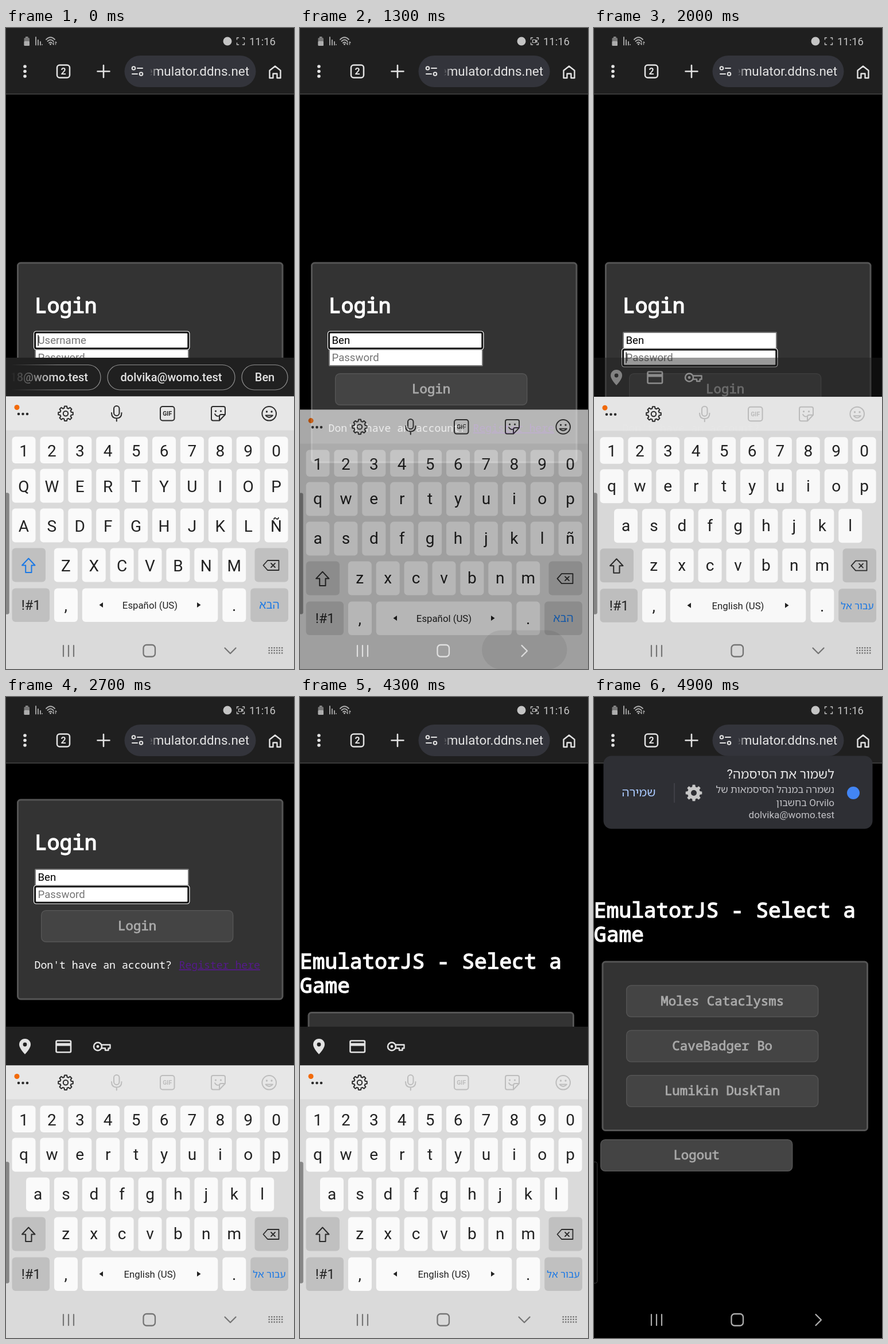
Animation, 502 px wide and 1116 px high, one loop 5000 ms. Source, as an HTML page:

```html
<!DOCTYPE html>
<html lang="en">
<head>
<meta charset="utf-8">
<title>Mobile login</title>
<style>
html, body { margin: 0; width: 100%; height: 100%; overflow: hidden; background: #000; }
svg { display: block; width: 100vw; height: 100vh; font-family: Roboto, 'Noto Sans Hebrew', 'Liberation Sans', sans-serif; }
text { white-space: pre; }
.mono { font-family: 'Noto Sans Mono', monospace; fill: #fff; }
.title { font-size: 36.2px; stroke: #fff; stroke-width: 1.5; }
.body { font-size: 18.15px; }
.btn { font-size: 22.4px; fill: #a9a9a9; stroke: #a9a9a9; stroke-width: .9; }
.field { font-size: 18.6px; }
.chip { font-size: 20px; font-weight: 500; fill: #e3e3e3; }
.key { font-size: 28px; fill: #222; }
.mid { text-anchor: middle; }
.end { text-anchor: end; }
.rtl { direction: rtl; text-anchor: start; }
.line { fill: none; stroke-linecap: round; stroke-linejoin: round; }
</style>
</head>
<body>
<svg id="stage" viewBox="0 0 502 1116" preserveAspectRatio="none"></svg>
<script>
const LOOP = 5000, STEP = 100;
const NAME = 'Ben', MAIL = 'dolvika@womo.test';
const GAMES = ['Moles Cataclysms', 'CaveBadger Bo', 'Lumikin DuskTan'];

const rect = (x, y, w, h, r, fill, more = '') =>
  `<rect x="${x}" y="${y}" width="${w}" height="${h}" rx="${r}" fill="${fill}" ${more}/>`;
const text = (x, y, s, cls = '', more = '') => `<text x="${x}" y="${y}" class="${cls}" ${more}>${s}</text>`;
const line = (d, color, w = 2, more = '') => `<path class="line" d="${d}" stroke="${color}" stroke-width="${w}" ${more}/>`;
const dot = (x, y, r, fill, more = '') => `<circle cx="${x}" cy="${y}" r="${r}" fill="${fill}" ${more}/>`;
const group = (id, body, more = '') => `<g id="${id}" ${more}>${body}</g>`;
const clamp = v => Math.max(0, Math.min(1, v));

function gear(cx, cy, r, teeth) {
  const pts = [];
  for (let i = 0; i < teeth; i++)
    for (const [k, f] of [[-.34, .76], [-.2, 1], [.2, 1], [.34, .76]]) {
      const a = (i + k) / teeth * 2 * Math.PI - Math.PI / 2;
      pts.push((cx + Math.cos(a) * r * f).toFixed(1) + ' ' + (cy + Math.sin(a) * r * f).toFixed(1));
    }
  return 'M' + pts.join('L') + 'Z';
}

// Browser page
const panel = (x, y, w, h) => rect(x, y, w, h, 5, '#333', 'stroke="#555" stroke-width="3"');
const button = (x, y, label) =>
  rect(x + .7, y + .7, 334, 54.6, 8, '#444', 'stroke="#555" stroke-width="1.4"') +
  text(x + 167.7, y + 35, label, 'mono btn mid');
const box = y => rect(51, y, 267, 28, 1, '#fff', 'stroke="#767676" stroke-width="2"');
const ring = (id, y) => group(id,
  rect(48.7, y - 1.8, 271, 31.6, 4, 'none', 'stroke="#fff" stroke-width="1.6"') +
  rect(50.6, y, 267.2, 28, 2.5, '#fff', 'stroke="#101010" stroke-width="3"'));

const login = panel(20.5, 409, 461.5, 347) +
  text(50, 496, 'Login', 'mono title') +
  box(530) + box(560) + ring('ringUser', 530) + ring('ringPass', 560) +
  text(55.5, 550, '', 'field', 'id="user"') + text(55.5, 580, '', 'field', 'id="pass"') +
  rect(0, 0, 1.3, 19, 0, '#000', 'id="caret"') +
  button(61, 601, 'Login') +
  text(49.5, 703, "Don't have an account?", 'mono body') +
  text(301.5, 703, 'Register here', 'mono body', 'style="fill:#551a8b" text-decoration="underline"');

const heading = y => text(0, y, 'EmulatorJS - Select a', 'mono title') + text(0, y + 42, 'Game', 'mono title');
const loading = heading(473) + panel(15, 549.5, 461.5, 116) +
  text(44.5, 614, 'Loading games...', 'mono body', 'style="font-size:18px"') + button(11, 682, 'Logout');
const games = heading(384) + panel(15, 461, 461.5, 293.5) +
  GAMES.map((g, i) => button(56, 501.5 + i * 78.3, g)).join('') + button(11, 770, 'Logout');

// Status bar and address bar
const INK = '#e3e3e3', DIM = '#c4c4c4', FAINT = '#adadad';
const header = rect(0, 0, 502, 115, 0, '#1f1f1f') + rect(0, 114.3, 502, 1.4, 0, '#4a4a4a') +
  rect(34, 15, 4.5, 3, 0, '#888') + rect(31.5, 17, 9.5, 14, 1.5, '#777') + rect(31.5, 23, 9.5, 8, 1.5, FAINT) +
  line('M52 16V29.500M56 21V29.500M60 24V29.500', FAINT, 1.8) + dot(63, 29, .9, FAINT) +
  line('M70 20Q77.500 12.500 85 20M72.500 23Q77.500 18 82.500 23M75 26Q77.500 23.500 80 26', FAINT, 1.8) +
  dot(77.5, 28.3, 1.5, FAINT) + line('M83 24V29M81.500 27.500L83 29.200M86.500 29V24M86.500 24L88 25.500', FAINT, 1.2) +
  dot(386, 23, 7.5, DIM) +
  line('M402.500 20V17H405.500M412.500 17H415.500V20M415.500 26V29H412.500M405.500 29H402.500V26', DIM, 1.4) +
  group('cam', line('M405.500 20.500H410.500V25.500H405.500ZM410.500 23L413 21V25Z', DIM, 1.2)) +
  text(470, 30, '11:16', 'end', `font-size="18.500" fill="${DIM}"`) +
  [67, 75.5, 84].map(y => dot(33, y, 2.8, INK)).join('') +
  rect(89, 64.5, 22, 22, 4.5, 'none', `stroke="${INK}" stroke-width="2.500"`) +
  text(100, 81.3, '2', 'mid', `font-size="16" font-weight="700" fill="${INK}"`) +
  line('M170 65V86M159.500 75.500H180.500', INK, 2.6) +
  rect(206.5, 48, 229, 55, 27.5, '#33343b') +
  dot(222.5, 70, 2.8, 'none', `stroke="${INK}" stroke-width="2"`) + line('M229 70H238', INK) +
  dot(235.5, 80, 2.8, 'none', `stroke="${INK}" stroke-width="2"`) + line('M220 80H229', INK) +
  text(424, 83, 'emulator.ddns.net', 'end', `font-size="22.400" fill="${INK}"`) +
  rect(242, 60, 22, 32, 0, 'url(#fadeUrl)') +
  line('M459.500 74L469 66.500L478.500 74V87H472.500V79.500H465.500V87H459.500Z', INK, 2.4);

// Autofill strip
const chip = (x, w) => rect(x, 586.5, w, 43.5, 21.7, 'none', 'stroke="#8e8e8e" stroke-width="1.200"');
const chips = chip(-80, 245) + chip(177, 222) + chip(411, 80) +
  text(143, 615, '518@womo.test', 'chip end') + rect(0, 580, 90, 58, 0, 'url(#fadeChip)') +
  text(288, 615, MAIL, 'chip mid') + text(451, 615, NAME, 'chip mid');
const fills =
  `<path d="M33 595C27 595 23 599.500 23 605C23 612 33 622 33 622C33 622 43 612 43 605C43 599.500 39 595 33 595Z" fill="${INK}"/>` +
  dot(33, 605, 3.4, '#202020') +
  rect(87.5, 598.5, 25.5, 20, 2, 'none', `stroke="${INK}" stroke-width="2.600"`) + rect(87.5, 602.5, 25.5, 5, 0, INK) +
  dot(160, 608.5, 7, 'none', `stroke="${INK}" stroke-width="2.600"`) + dot(160, 608.5, 2.4, INK) +
  line('M166.500 605.500H181.500V611.500H178.500V615H173V611.500H166.500', INK, 2.4);
const strip = rect(0, 574, 502, 68, 0, '#202020') + group('chips', chips) + group('fills', fills);

// Keyboard
const PITCH = 48.9, WHITE = '#fafafa', GREY = '#c0c0c0', DARK = '#2b2b2b', BLUE = '#1a78e5';
const keys = (s, x, y, h, base) => [...s].map((c, i) =>
  rect(x + i * PITCH - 20.5, y, 41, h, 6, WHITE) + text(x + i * PITCH, base, c, 'key mid')).join('');
const rows = (letters, base) => letters.map((s, i) =>
  keys(s, [31, s.length > 9 ? 31 : 55.5, 104.3][i], 767.5 + 69 * i, 59, 767.5 + 69 * i + base)).join('');
const label = (x, y, s, size, fill = '#222') => text(x, y, s, 'mid', `font-size="${size}" fill="${fill}"`);
const ES = ['qwertyuiop', 'asdfghjklñ', 'zxcvbnm'], EN = [ES[0], 'asdfghjkl', ES[2]];

const tools =
  rect(188, 658, 9.5, 17, 4.7, 'none', 'stroke="currentColor" stroke-width="2"') +
  line('M184 670Q184 679.500 192.800 679.500Q201.500 679.500 201.500 670M192.800 680V684.500', 'currentColor') +
  rect(269, 659, 24.5, 24.5, 4, 'none', 'stroke="currentColor" stroke-width="2"') +
  text(281.2, 675.3, 'GIF', 'mid', 'font-size="10.500" font-weight="700" fill="currentColor"') +
  line('M361 659H379Q382 659 382 662V673L372 683.500H361Q358 683.500 358 680.500V662Q358 659 361 659ZM382 673H375Q372 673 372 676V683', 'currentColor') +
  line('M364 672Q367 677 371 675.500', 'currentColor', 1.8) + dot(365.5, 667, 1.6, 'currentColor') + dot(374.5, 667, 1.6, 'currentColor') +
  dot(458.7, 671.3, 12.3, 'none', 'stroke="currentColor" stroke-width="2"') +
  dot(454.5, 668, 1.7, 'currentColor') + dot(463, 668, 1.7, 'currentColor') +
  line('M452.500 674.500Q458.700 681.500 465 674.500Z', 'currentColor', 1.8);

const keyboard = rect(0, 641.5, 502, 580, 0, '#dadada') + rect(0, 641.5, 502, 59, 0, '#e7e7e7') +
  [22, 29.5, 37].map(x => dot(x, 672, 2.3, DARK)).join('') + dot(19, 660.5, 4.5, '#f26a0a') +
  line(gear(104, 671.3, 13, 8), DARK) + dot(104, 671.3, 4.2, 'none', `stroke="${DARK}" stroke-width="2"`) +
  group('tools', tools) +
  keys('1234567890', 31, 711.5, 46.5, 745.5) +
  group('upper', rows(ES.map(r => r.toUpperCase()), 40)) + group('lower', rows(ES, 38.5)) + group('english', rows(EN, 38.5)) +
  rect(10.5, 905.5, 58.5, 59, 6, GREY) +
  line('M39.300 923.500L50.500 935.500H44.500V948H34.200V935.500H28Z', 'currentColor', 2, 'id="shift"') +
  rect(433.5, 905.5, 58.5, 59, 6, GREY) +
  line('M448.500 935.500L456 927H475.500V944H456ZM462 932L469 939M469 932L462 939', DARK, 1.8) +
  rect(10.5, 975.5, 65.5, 58.5, 6, GREY) + label(43.7, 1013, '!#1', 23.6) +
  rect(84, 975.5, 41, 58.5, 6, WHITE) + label(104.3, 1015, ',', 28) +
  rect(132.8, 975.5, 236.5, 58.5, 6, WHITE) +
  '<path d="M169 1000V1009L162.500 1004.500ZM333 1000V1009L339.500 1004.500Z" fill="#222"/>' +
  text(251, 1011, '', 'mid', 'id="lang" font-size="16.800" fill="#222"') +
  rect(377.3, 975.5, 41, 58.5, 6, WHITE) + label(397.7, 1015, '.', 28) +
  rect(426.2, 975.5, 65.8, 58.5, 6, GREY) +
  text(459, 1011, '', 'mid', `id="enter" fill="${BLUE}"`);

// System navigation
const C = 'currentColor';
let padDots = '';
for (let i = 0; i < 18; i++) padDots += rect(457.5 + i % 6 * 4.5, 1078 + Math.floor(i / 6) * 4.5, 2.4, 2.4, 0, C);
const nav = group('ripple', rect(317, 1048.5, 148.5, 68, 34, '#000')) +
  group('nav',
    line('M100 1075V1094M109 1075V1094M118 1075V1094', C, 2.2) +
    rect(239.5, 1074, 20.5, 20.5, 5.5, 'none', `stroke="${C}" stroke-width="2.300"`) +
    group('down', line('M381.500 1079.500L391 1089L400.500 1079.500', C, 2.3) + padDots) +
    group('back', line('M386.500 1075L396 1084.500L386.500 1094', C, 2.3)));
const handle = rect(-8, 809.5, 13.5, 211, 3, 'rgba(0,0,0,.38)', 'stroke="rgba(130,130,130,.45)" stroke-width="1"');

// Save-password prompt
const rtl = (y, s, size, fill) => text(419, y, s, 'rtl', `font-size="${size}" fill="${fill}"`);
const prompt = rect(16.5, 102.5, 469, 127, 14, '#2e2f34') +
  rtl(142, 'לשמור את הסיסמה?', 22, '#e8e8e8') +
  rtl(167, 'נשמרה במנהל הסיסמאות של', 17, '#c2c2c6') +
  rtl(190, 'Orvilo בחשבון', 17, '#c2c2c6') +
  text(419, 211, MAIL, 'end', 'font-size="17" fill="#c2c2c6"') +
  label(78, 173, 'שמירה', 21, '#a8c7fa') + rect(139.5, 150, 1, 34, 0, '#505158') +
  `<path d="${gear(174, 167, 14.5, 8)}" fill="#c7c7c7"/>` + dot(174, 167, 5, '#2e2f34') +
  dot(452, 167, 11, '#4285f4');

const fade = (id, color, from) => `<linearGradient id="${id}"><stop offset="${from}" stop-color="${color}"/>` +
  `<stop offset="1" stop-color="${color}" stop-opacity="0"/></linearGradient>`;

document.getElementById('stage').innerHTML =
  `<defs>${fade('fadeUrl', '#33343b', .4)}${fade('fadeChip', '#202020', .1)}</defs>` +
  rect(0, 0, 502, 1116, 0, '#000') +
  group('login', login) + group('loading', loading) + group('games', games) +
  header + group('strip', strip) + group('keyboard', keyboard) + handle + nav + group('prompt', prompt);

const $ = Object.fromEntries([...document.querySelectorAll('#stage [id]')].map(e => [e.id, e]));
const show = (el, on) => { el.style.display = on ? '' : 'none'; };
const shift = (el, x, y) => el.setAttribute('transform', `translate(${x} ${y})`);

const USER_KEYS = [200, 500, 700], PASS_KEYS = [2900, 3200, 3500];
const FOCUS = 1750, HIDE1 = 1232, SHOW = 1700, HIDE2 = 4332, LEAVE = 4300, LOADED = 4700;
const typed = (times, t) => times.filter(k => k <= t).length;

// 0 = keyboard fully up, 1 = gone
function hidden(t) {
  if (t < SHOW) return clamp((t - HIDE1) / 250);
  if (t < HIDE2) return (1 - clamp((t - SHOW) / 330)) ** 2;
  return clamp((t - HIDE2) / 250);
}

function setField(el, value, hint) {
  el.textContent = value || hint;
  el.setAttribute('fill', value ? '#000' : '#757575');
}

function drawLogin(t) {
  const inPass = t >= FOCUS;
  const nu = typed(USER_KEYS, t), np = typed(PASS_KEYS, t);
  setField($.user, NAME.slice(0, nu), 'Username');
  setField($.pass, np ? '•'.repeat(np - 1) + NAME.toLowerCase()[np - 1] : '', 'Password');
  show($.ringUser, !inPass);
  show($.ringPass, inPass);

  const last = Math.max(inPass ? FOCUS : 0, ...[...USER_KEYS, ...PASS_KEYS].filter(k => k <= t));
  const el = inPass ? $.pass : $.user, filled = inPass ? np : nu;
  show($.caret, (t - last) % 1000 < 500);
  $.caret.setAttribute('x', 55.5 + (filled ? el.getComputedTextLength() + .5 : 0));
  $.caret.setAttribute('y', inPass ? 564.5 : 534.5);

  const p = clamp((t - 2150) / 300);
  shift($.login, 0, -230 * p * p * (3 - 2 * p));
}

function draw(t) {
  show($.login, t < LEAVE);
  show($.loading, t >= LEAVE && t < LOADED);
  show($.games, t >= LOADED);
  if (t < LEAVE) drawLogin(t);

  const blink = t % 1000;
  show($.cam, blink >= 300 && blink < 800);

  const q = hidden(t), english = t >= SHOW, caps = t < USER_KEYS[0];
  show($.keyboard, q < 1);
  shift($.keyboard, 0, 85 * q);
  $.keyboard.style.opacity = 1 - q;
  show($.upper, caps);
  show($.lower, !caps && !english);
  show($.english, english);
  $.shift.style.color = caps ? BLUE : DARK;
  $.tools.style.color = english ? '#bdbdbd' : DARK;
  $.lang.textContent = english ? 'English (US)' : 'Español (US)';
  $.enter.textContent = english ? 'עבור אל' : 'הבא';
  $.enter.setAttribute('font-size', english ? 17 : 19.5);

  const bar = t < HIDE1 ? 1 : t < HIDE2 ? clamp((t - 1910) / 200) : 0;
  show($.strip, bar > 0);
  $.strip.style.opacity = bar;
  show($.chips, !english);
  show($.fills, english);
  shift($.fills, 11 * (1 - bar), 0);

  const up = t < 1200 || t >= SHOW && t < HIDE2;
  show($.down, up);
  show($.back, !up);
  const lit = t < HIDE1 || t >= SHOW && t < HIDE2;
  $.nav.style.color = lit ? '#000' : '#fff';
  $.nav.style.opacity = lit ? .46 : .68;
  show($.ripple, t >= 1200 && t < 1500);
  $.ripple.style.opacity = .07 * clamp((1500 - t) / 200);

  const p = clamp((t - LOADED) / 200);
  show($.prompt, p > 0);
  shift($.prompt, 0, -84 * (1 - p) ** 2);
}

const start = performance.now();
function tick() {
  const t = (performance.now() - start) % LOOP;
  draw(Math.floor(t / STEP) * STEP);
  requestAnimationFrame(tick);
}
tick();
</script>
</body>
</html>
```
